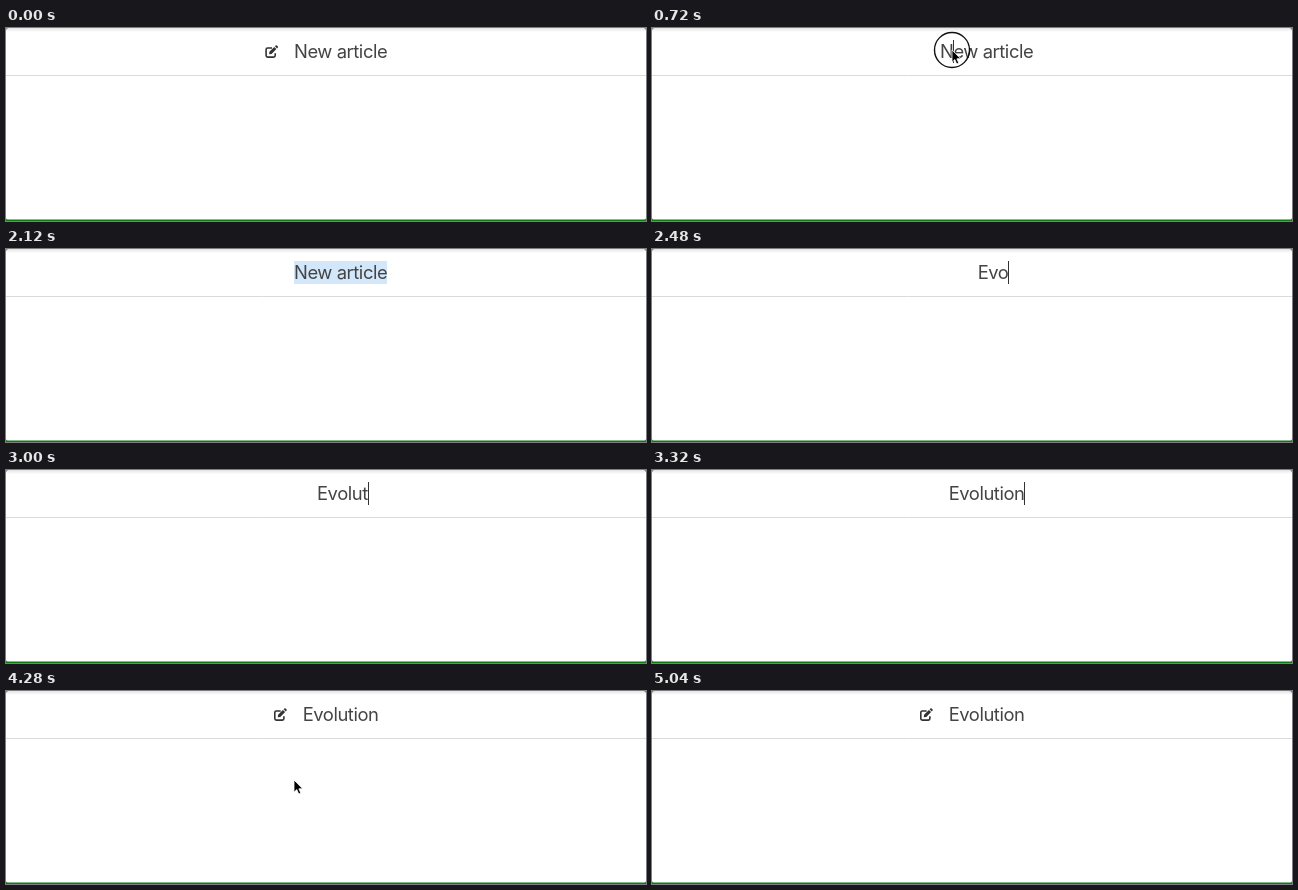
An HTML page that plays this animation: 640 px wide and 193 px high, repeating every 5.76 s.

```html
<!DOCTYPE html>
<html lang="en">
<head>
<meta charset="utf-8">
<title>Renaming an article</title>
<style>
  html, body { margin: 0; width: 100%; height: 100%; overflow: hidden; background: #fff; }
  svg { display: block; width: 640px; height: 193px; }
  text { font: 18.4px Inter, Roboto, sans-serif; letter-spacing: -.45px; fill: #444; white-space: pre; }
</style>
</head>
<body>
<svg viewBox="0 0 640 193">
  <defs>
    <linearGradient id="shade" x2="0" y2="1">
      <stop stop-color="#e3e3e3"/>
      <stop offset="1" stop-color="#fff"/>
    </linearGradient>
  </defs>
  <rect width="640" height="193" fill="#fff"/>
  <rect width="640" height="4" fill="url(#shade)"/>
  <path d="M0 0h2L0 2zM640 0h-2l2 2z" fill="#888"/>
  <path d="M0 47.5H640" stroke="#dadada"/>
  <path d="M0 190Q0 191.5 2 191.5H638Q640 191.5 640 190V193H0z" fill="#0b7b12"/>

  <rect id="selection" x="288" y="12" height="23" fill="#d3e7fb"/>
  <text id="title" y="30.4"></text>
  <path id="caret" stroke="#333"/>
  <g id="icon">
    <path d="M6.8 3H2.4Q.9 3 .9 4.5V10.6Q.9 12.1 2.4 12.1H8.5Q10 12.1 10 10.6V8.2"
          fill="none" stroke="#333" stroke-width="1.6"/>
    <path d="M3.9 9.2L4.2 6.7 9 1.9 11.2 4.1 6.4 8.9zM9.7 1.2L10.5.4Q11.1-.1 11.7.4L12.7 1.4Q13.2 2 12.7 2.6L11.9 3.4z"
          fill="#333"/>
  </g>
  <g id="pointer">
    <circle id="ring" fill="none" stroke="#111" stroke-width="1.4"/>
    <path id="arrow" d="M0 0V12.2L2.8 9.6 4.7 14 6.8 13.1 4.9 8.8H8.7z"
          fill="#000" stroke="#fff" stroke-width=".8"/>
    <path id="beam" d="M-2.5-7Q-.3-7 0-5.5Q.3-7 2.5-7M0-5.5V5.5M-2.5 7Q-.3 7 0 5.5Q.3 7 2.5 7M-1.5 2.5H1.5"
          fill="none" stroke="#222"/>
  </g>
</svg>
<script>
const LOOP = 5760, STEP = 40;
const el = id => document.getElementById(id);
const show = (id, on) => el(id).setAttribute('visibility', on ? 'visible' : 'hidden');
const within = (t, from, to) => t >= from && t < to;

// Each keystroke: time, left edge of the text.
const word = 'Evolution';
const keys = [[2160, 336], [2320, 331], [2480, 325.7], [2640, 320.5], [2840, 316.5],
              [3000, 311], [3120, 308], [3240, 303], [3320, 296.7]];

// Pointer trips: lists of [time, x, y]; the pointer is hidden between trips.
const trips = [
  [[200, 306, 171], [560, 300, 22], [800, 300, 22], [1080, 293, 26], [1600, 293, 26]],
  [[3800, 293, 26], [4000, 265, 47], [4040, 262, 55], [4160, 288, 89],
   [4760, 288, 89], [5040, 307, 193]]
];

// Clicks: press, release, and whether the ring widens on release.
const clicks = [[600, 680, true], [1160, 1280, false], [1320, 1360, false],
                [1400, 1600, false], [4160, 4200, true]];

function pointerAt(t) {
  const trip = trips.find(p => within(t, p[0][0], p[p.length - 1][0]));
  if (!trip) return null;
  const i = trip.findIndex(p => p[0] > t);
  const [t0, x0, y0] = trip[i - 1], [t1, x1, y1] = trip[i];
  let k = (t - t0) / (t1 - t0);
  if (t0 === 200) k = k * k * (3 - 2 * k);
  return [x0 + (x1 - x0) * k, y0 + (y1 - y0) * k];
}

function ringRadius(t) {
  for (const [press, release, widens] of clicks) {
    if (within(t, press, release)) return 13;
    if (widens && within(t, release, release + 2 * STEP)) return t < release + STEP ? 15.5 : 17.5;
  }
  return 0;
}

function draw(t) {
  const typed = keys.filter(k => t >= k[0]).length;
  const left = typed ? keys[typed - 1][1] : 288;
  const title = el('title');
  title.textContent = typed ? word.slice(0, typed) : 'New article';
  title.setAttribute('x', left);

  show('icon', t < 600 || t >= 4200);
  el('icon').setAttribute('transform', `translate(${left - 28.8} 17)`);

  const selecting = within(t, 1320, 2160);
  show('selection', selecting);
  el('selection').setAttribute('width', t < 1400 ? 38 : 93);

  show('caret', within(t, 640, 3800) && !selecting);
  const caretX = typed ? left + title.getComputedTextLength() : t < 1160 ? 301 : 288;
  el('caret').setAttribute('d', `M${Math.round(caretX) + .5} 12V35`);

  const at = pointerAt(t);
  const radius = at ? ringRadius(t) : 0;
  const overText = within(t, 760, 1600) || within(t, 3800, 3880);
  if (at) el('pointer').setAttribute('transform', `translate(${at})`);
  el('ring').setAttribute('r', radius);
  show('ring', radius > 0);
  show('arrow', at && !overText);
  show('beam', at && overText);
}

function tick() {
  draw(Math.floor(performance.now() % LOOP / STEP) * STEP);
  requestAnimationFrame(tick);
}
tick();
</script>
</body>
</html>
```
